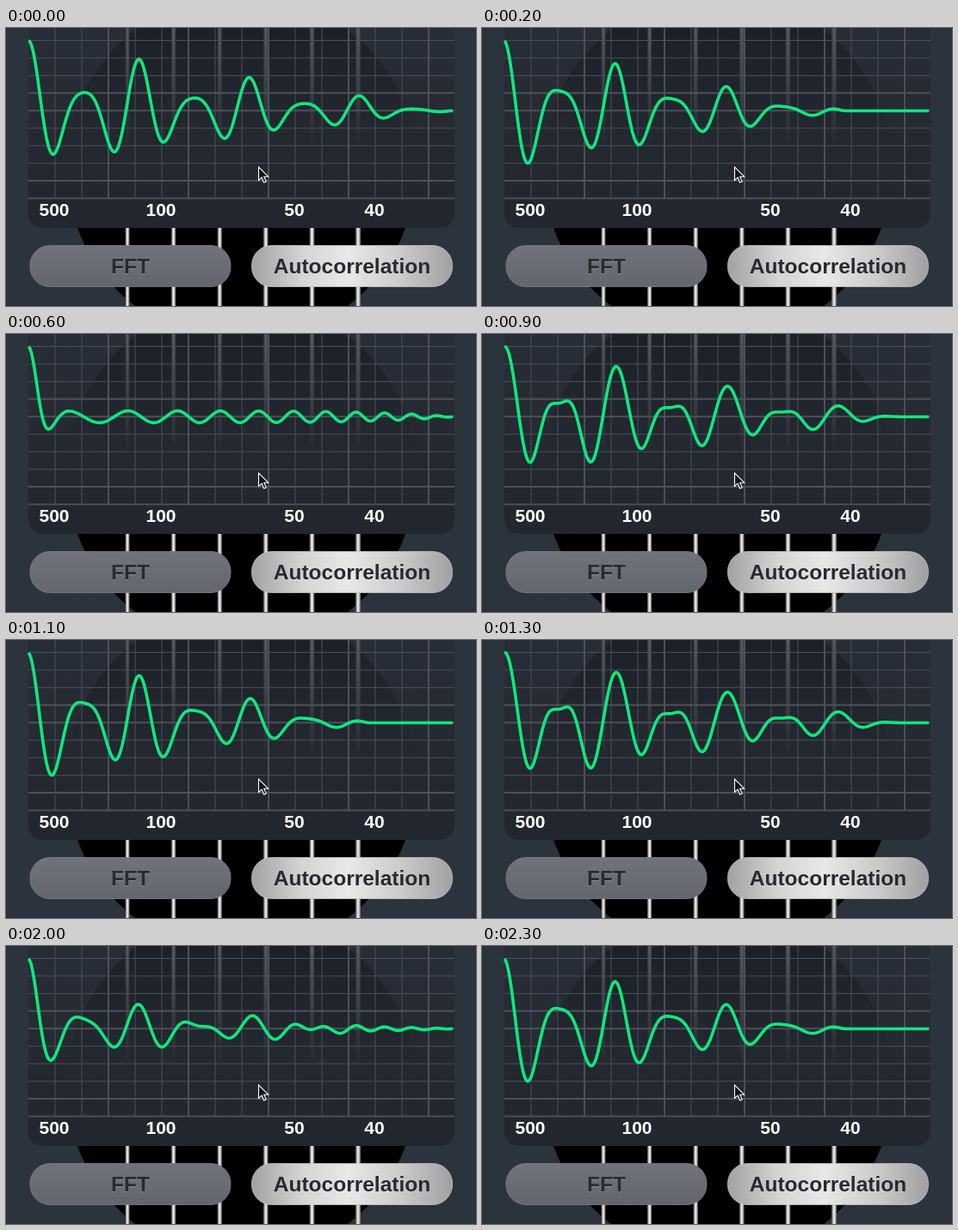
Animation, 546 px wide and 324 px high, one loop 2400 ms. Source, as an HTML page:

```html
<!DOCTYPE html>
<html lang="en">
<head>
<meta charset="utf-8">
<title>Autocorrelation</title>
<style>
  html, body { margin: 0; width: 100%; height: 100%; overflow: hidden; background: #2b343c; }
  svg { display: block; width: 546px; height: 324px; }
  text { font: bold 21px "Liberation Sans", Arial, sans-serif; text-anchor: middle; fill: #fff; }
  .button { font-size: 24.5px; fill: #292a30; }
  .glint { fill: #fff; opacity: .22; }
</style>
</head>
<body>
<svg viewBox="0 0 546 324">
  <defs>
    <linearGradient id="glass" x2="0" y2="1">
      <stop stop-color="#262b35" stop-opacity=".74"/>
      <stop offset="0.48" stop-color="#252932" stop-opacity=".95"/>
      <stop offset="0.6" stop-color="#242830"/>
      <stop offset="1" stop-color="#22262e"/>
    </linearGradient>
    <linearGradient id="string">
      <stop stop-color="#444"/><stop offset="0.5" stop-color="#fff"/><stop offset="1" stop-color="#555"/>
    </linearGradient>
    <linearGradient id="slate" x2="0" y2="1">
      <stop stop-color="#70737c"/><stop offset="1" stop-color="#64666f"/>
    </linearGradient>
    <linearGradient id="metal">
      <stop stop-color="#a2a2a4"/><stop offset="0.25" stop-color="#d4d4d5"/>
      <stop offset="0.48" stop-color="#e8e8e8"/><stop offset="0.75" stop-color="#cacacb"/>
      <stop offset="1" stop-color="#a0a0a2"/>
    </linearGradient>
  </defs>
  <rect width="546" height="324" fill="#2b343c"/>
  <circle cx="273.5" cy="163" r="203"/>
  <g id="strings" fill="url(#string)"></g>
  <path d="M26 0H521V217a16 16 0 0 1-16 16H42a16 16 0 0 1-16-16Z" fill="url(#glass)"/>
  <g stroke="#4d4f59">
    <path id="thin"/>
    <path id="thick" stroke-width="2"/>
  </g>
  <g id="labels"></g>
  <path id="wave" fill="none" stroke="#0ee87e" stroke-width="3.6" stroke-linejoin="round"/>
  <g id="buttons"></g>
  <path d="M293.5 162V177.5l3.6-3.3 2.5 5.8 2.6-1.1-2.5-5.7h4.9Z" fill="#111" stroke="#fff" stroke-width="1.1"/>
</svg>
<script>
const $ = id => document.getElementById(id);
const LOOP = 2400, STEP = 100, LEFT = 26, WIDTH = 493, ZERO = 96.5, HEIGHT = 81.5;
const TAU = 2 * Math.PI;

for (let i = 0; i < 6; i++) {
  const w = 5 + i * 0.2;
  $("strings").innerHTML += `<rect x="${141 + i * 53.6 - w / 2}" width="${w}" height="324"/>`;
}

const grid = { thin: "", thick: "" };
for (let i = 0; i < 15; i++) grid[i % 3 == 2 ? "thick" : "thin"] += `M${57 + i * 31} 0V199`;
for (let i = 0; i < 10; i++) grid[i % 5 > 2 ? "thick" : "thin"] += `M26 ${14.5 + i * 20.45}H521`;
for (const id in grid) $(id).setAttribute("d", grid[id]);

$("labels").innerHTML = [[56, 500], [180, 100], [335, 50], [428, 40]]
  .map(([x, n]) => `<text x="${x}" y="219">${n}</text>`).join("");

function addButton(x, fill, rim, label) {
  const text = (kind, y) => `<text class="button ${kind}" x="${x + 116.5}" y="${y}">${label}</text>`;
  $("buttons").innerHTML += `<rect x="${x}" y="253.5" width="233" height="48" rx="23"
    fill="url(#${fill})" stroke="${rim}" stroke-width=".8"/>` + text("glint", 287) + text("", 286);
}
addButton(28, "slate", "#7c7f88", "FFT");
addButton(285.5, "metal", "#c4c4c6", "Autocorrelation");

// Autocorrelation of a periodic tone: harmonics under a window falling to zero at `reach`.
const tone = (period, reach, skew, harmonics) => d => {
  const a = TAU * d / period;
  const lean = skew * (3 * Math.sin(a) + 4 * Math.sin(2 * a));
  return Math.max(0, 1 - d / reach)
    * harmonics.reduce((sum, h, k) => sum + h * Math.cos((k + 1) * a), lean);
};
const pluck = tone(128.2, 490, 0.009, [0.13, 0.65, 0.22]);
const decay = tone(129.4, 395, -0.01, [0.06, 0.67, 0.27]);
const ring = tone(129.4, 460, 0.016, [0.15, 0.667, 0.235, -0.052]);

// Without a tone: one narrow lobe, then a faint ripple that gets quicker.
const noise = d => {
  const lobe = Math.exp(-((d / 21) ** 2)) * Math.cos(TAU * d / 66);
  const ripple = Math.cos(TAU * (0.01007 * d + 0.0000253 * d * d - 0.504));
  return lobe + 0.085 * Math.min(1, d / 45) * (1 - (d / WIDTH) ** 6) * ripple;
};

const keys = [[0, pluck], [200, decay], [600, noise], [900, ring], [1100, decay],
  [1300, ring], [1500, decay], [1700, noise], [2300, decay], [LOOP, pluck]];

function draw() {
  const t = Math.floor(performance.now() % LOOP / STEP) * STEP;
  const i = keys.findIndex(([time]) => time > t);
  const [t0, from] = keys[i - 1], [t1, to] = keys[i];
  const u = (t - t0) / (t1 - t0);
  const points = [];
  for (let d = 0; d <= WIDTH; d++) {
    const r = from(d) * (1 - u) + to(d) * u;
    points.push(`${LEFT + d} ${(ZERO - HEIGHT * r).toFixed(2)}`);
  }
  $("wave").setAttribute("d", "M" + points.join("L"));
  requestAnimationFrame(draw);
}
draw();
</script>
</body>
</html>
```
